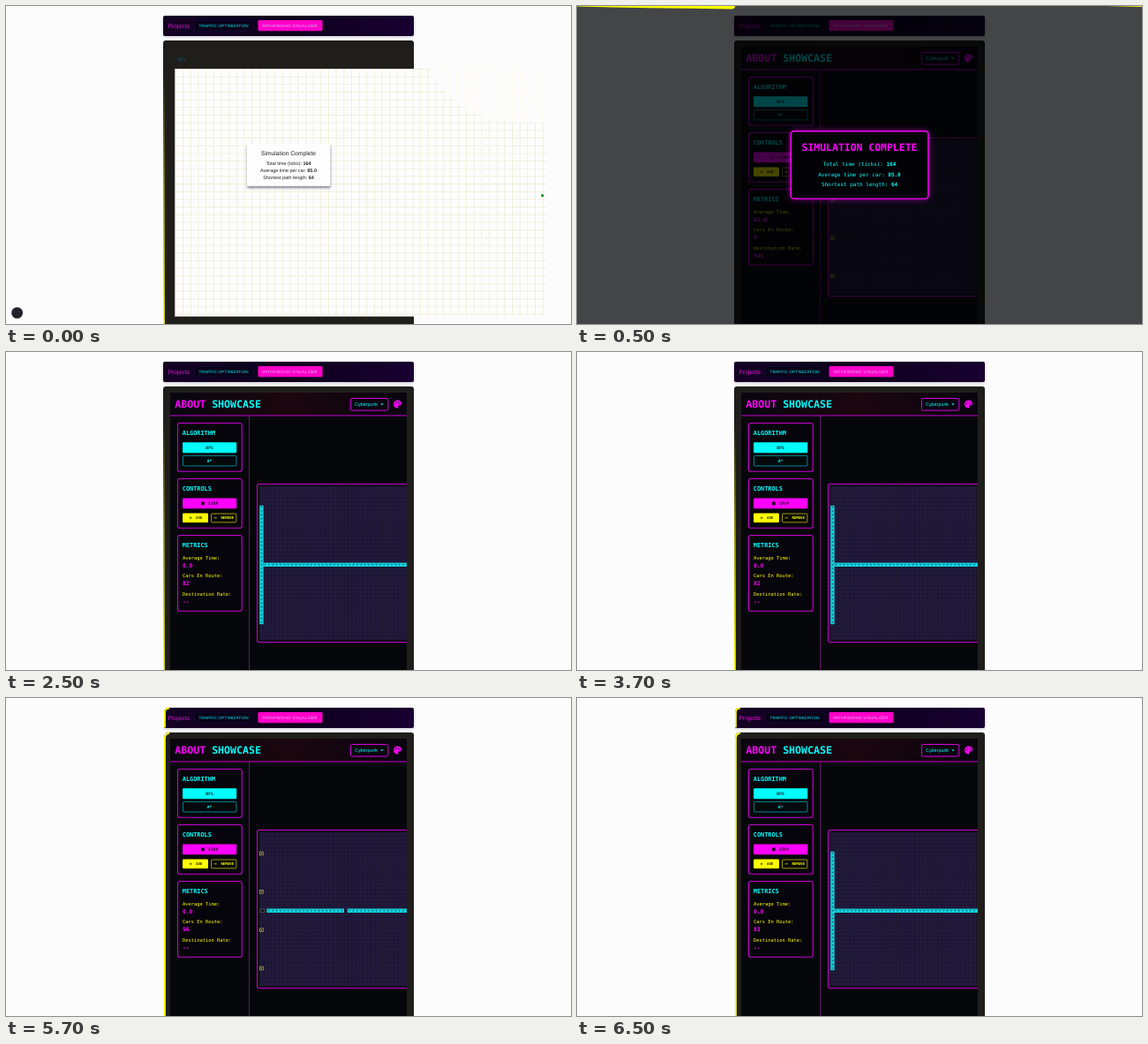
An HTML page for the animation above (8 s loop, 640x360 px).

```html
<!DOCTYPE html>
<html lang="en">
<head>
<meta charset="utf-8">
<title>Pathfinding showcase</title>
<style>
html, body { margin: 0; width: 100%; height: 100%; overflow: hidden; background: #fcfcfd; }
svg { display: block; width: 100vw; height: 100vh; }
text { font-family: "DejaVu Sans Mono", monospace; text-rendering: geometricPrecision; white-space: pre; }
.sans { font-family: "Liberation Sans", Arial, sans-serif; }
.b, .b text { font-weight: 700; }
.mid { text-anchor: middle; }
.mag { fill: #f0f; }
.cy { fill: #0ff; }
.yel { fill: #ff0; }
.head { font-size: 6.85px; font-weight: 700; fill: #0ff; }
.label { font-size: 5.43px; fill: #ff0; }
.value { font-size: 6.4px; font-weight: 700; fill: #f0f; }
.box { fill: #07050c; stroke: #c800d2; stroke-width: 1.1; }
.show { visibility: hidden; animation: 8s step-end infinite; }
.light { animation-name: light; }
.dash { animation-name: dash; }
.done { animation-name: done; }
.run { animation-name: run; }
.run1 { animation-name: run1; }
.run2 { animation-name: run2; }
.run3 { animation-name: run3; }
.full { animation-name: full; }
.spots { animation-name: spots; }
.edge { animation-name: edge; }
.fade { animation-name: fade; }
@keyframes light { 0% { visibility: visible } 6.25%, 100% { visibility: hidden } }
@keyframes dash { 0% { visibility: hidden } 6.25%, 100% { visibility: visible } }
@keyframes done { 0%, 31.25%, 100% { visibility: hidden } 6.25% { visibility: visible } }
@keyframes run { 0% { visibility: hidden } 31.25%, 100% { visibility: visible } }
@keyframes run1 { 0%, 56.25%, 100% { visibility: hidden } 31.25% { visibility: visible } }
@keyframes run2 { 0%, 81.25%, 100% { visibility: hidden } 56.25% { visibility: visible } }
@keyframes run3 { 0% { visibility: hidden } 81.25%, 100% { visibility: visible } }
@keyframes full { 0%, 56.25% { visibility: hidden } 31.25%, 81.25%, 100% { visibility: visible } }
@keyframes spots { 0%, 31.25%, 81.25%, 100% { visibility: hidden } 6.25%, 56.25% { visibility: visible } }
@keyframes edge { 0% { visibility: hidden } 56.25%, 100% { visibility: visible } }
@keyframes fade { 0%, 31.25% { visibility: visible } 6.25%, 56.25%, 100% { visibility: hidden } }
</style>
</head>
<body>
<svg viewBox="0 0 640 360">
  <defs>
    <linearGradient id="bar">
      <stop offset="0" stop-color="#150024"/>
      <stop offset=".5" stop-color="#0d001c"/>
      <stop offset="1" stop-color="#180030"/>
    </linearGradient>
    <linearGradient id="top">
      <stop offset="0" stop-color="#08060e"/>
      <stop offset=".5" stop-color="#1c060f"/>
      <stop offset="1" stop-color="#08040f"/>
    </linearGradient>
    <linearGradient id="strip" x2="0" y2="1">
      <stop offset="0" stop-color="#ff0" stop-opacity="0"/>
      <stop offset=".45" stop-color="#ff0" stop-opacity=".55"/>
      <stop offset="1" stop-color="#ff0"/>
    </linearGradient>
    <pattern id="dots" x="191.5" y="71" width="8.67" height="8.67" patternUnits="userSpaceOnUse">
      <path d="M.4 0V8.67M0 .4H8.67" fill="none" stroke="#d9d69c" stroke-width=".8" stroke-dasharray="1.45 1.44"/>
    </pattern>
    <pattern id="pale" x="191.5" y="71" width="8.67" height="8.67" patternUnits="userSpaceOnUse">
      <path d="M.4 0V8.67M0 .4H8.67" fill="none" stroke="#fbfad0" stroke-width=".8" stroke-dasharray="1.45 1.44"/>
    </pattern>
    <pattern id="cells" x="287.2" y="152" width="4.34" height="4.34" patternUnits="userSpaceOnUse">
      <rect width="4.34" height="4.34" fill="#221940"/>
      <path d="M0 .4H4.34M.4 0V4.34" stroke="#191526" stroke-width=".8"/>
    </pattern>
    <pattern id="cars" x="287.2" y="238.6" width="4.34" height="4.34" patternUnits="userSpaceOnUse">
      <rect width="4.34" height="4.34" fill="#087078"/>
      <rect x=".6" y=".6" width="3.2" height="3.2" fill="#0c9ca8" stroke="#10e4f0" stroke-width="1"/>
      <rect x="1.7" y="1.7" width="1" height="1" fill="#084850"/>
    </pattern>
    <filter id="soft" x="-20%" y="-30%" width="140%" height="160%">
      <feGaussianBlur stdDeviation="1.8"/>
    </filter>
    <filter id="glow" x="-20%" y="-30%" width="140%" height="160%">
      <feGaussianBlur stdDeviation="3.5"/>
    </filter>
    <clipPath id="app"><rect x="186" y="46" width="268" height="314"/></clipPath>
    <g id="spot">
      <rect x="-1.9" y="-1.9" width="3.8" height="3.8" fill="#18140c" stroke="#b9ad78" stroke-width=".7"/>
      <rect x="-.6" y="-.6" width="1.2" height="1.2" fill="#e8dca0"/>
    </g>
  </defs>

  <rect width="640" height="360" fill="#fcfcfd"/>

  <!-- navigation bar and panel -->
  <rect x="178" y="12" width="284" height="23" rx="2" fill="#889" opacity=".5" filter="url(#soft)"/>
  <rect x="178" y="11" width="284" height="23" rx="2" fill="url(#bar)"/>
  <text class="sans" x="183.4" y="24.6" font-size="6.8" fill="#e010d8">Projects</text>
  <rect x="213.5" y="16.3" width="66.5" height="11.6" rx="1.4" fill="#0a0018" stroke="#101038" stroke-width=".7"/>
  <text class="sans cy" x="218.5" y="23.8" font-size="4.66" letter-spacing=".13">TRAFFIC OPTIMIZATION</text>
  <rect x="285.5" y="16" width="73" height="12.2" rx="1.4" fill="#ff00c8"/>
  <text class="sans" x="290.4" y="23.8" font-size="4.68" letter-spacing=".13" fill="#ecb0ff">PATHFINDING VISUALIZER</text>
  <rect x="178" y="39" width="284" height="330" rx="3" fill="#201e1b"/>
  <rect class="show fade" x="178" y="80" width="1.8" height="280" fill="url(#strip)"/>
  <g class="show edge">
    <path d="M176 10H186Q179 11 179 16V35H176ZM176 38H186Q179 39 179 46V360H176Z" fill="#fcfcfd"/>
    <path d="M185 11.5Q179.9 11.8 179.9 16V33.5M185 39.7Q179.9 40.3 179.9 46V360" fill="none" stroke="#ff0" stroke-width="1.9"/>
  </g>

  <!-- light view -->
  <g class="show light">
    <text class="sans" x="195" y="61.8" font-size="4.7" fill="#0c5878">BFS</text>
    <rect x="191.3" y="71" width="420.7" height="280.5" fill="#fdfdfe"/>
    <path d="M191.3 71H480Q500 112 545 126Q575 133 612 132V351.5H191.3Z" fill="url(#dots)"/>
    <path d="M480 71H612V132Q575 133 545 126Q500 112 480 71Z" fill="url(#pale)"/>
    <circle cx="607.6" cy="214.6" r="1.6" fill="#0a8a1c"/>
    <rect x="273" y="158" width="94.5" height="48" rx="1.5" fill="#445" opacity=".65" filter="url(#soft)"/>
    <rect x="272.8" y="156" width="94.6" height="48" rx="1.5" fill="#fdfdfe"/>
    <g class="mid" fill="#222">
      <text class="sans" x="320" y="169.3" font-size="6.72">Simulation Complete</text>
      <g font-size="5.43">
        <text class="sans" x="320" y="180.2">Total time (ticks): <tspan class="b">164</tspan></text>
        <text class="sans" x="320" y="188.2">Average time per car: <tspan class="b">85.0</tspan></text>
        <text class="sans" x="320" y="196.3">Shortest path length: <tspan class="b">64</tspan></text>
      </g>
    </g>
    <circle cx="12.6" cy="347.4" r="6.4" fill="#22222c"/>
  </g>

  <!-- dark dashboard -->
  <g class="show dash" clip-path="url(#app)">
    <rect x="186" y="46" width="268" height="314" fill="#05070a"/>
    <rect x="186" y="46" width="268" height="26" fill="url(#top)"/>
    <path d="M186 72H454" stroke="#c800d2"/>
    <path d="M275.6 72V360" stroke="#7c1684" stroke-width=".9"/>
    <text class="b" x="191.3" y="63.1" font-size="11.58"><tspan class="mag">ABOUT</tspan> <tspan class="cy">SHOWCASE</tspan></text>

    <rect x="390.4" y="52.5" width="42.4" height="13.6" rx="2" fill="#0a0510" stroke="#d800e0"/>
    <text class="sans cy" x="395" y="61.1" font-size="5.4">Cyberpunk</text>
    <path class="cy" d="M424.2 58.4h3.4l-1.7 1.9z"/>
    <path class="mag" d="M443.4 54.6a4.5 4.5 0 1 0 0 9c1.2 0 1.3-1 .8-1.6c-.5-.8 0-1.6.9-1.6h1.2c1.1 0 1.7-.8 1.7-1.9c0-2.2-2-3.9-4.6-3.9z"/>
    <g fill="#10040f">
      <circle cx="440.8" cy="59" r=".7"/><circle cx="442.1" cy="57" r=".7"/>
      <circle cx="444.6" cy="57" r=".7"/><circle cx="446.1" cy="58.7" r=".7"/>
    </g>

    <g class="box">
      <rect x="194.5" y="80.5" width="72.7" height="54.7" rx="2"/>
      <rect x="194.5" y="143.5" width="72.7" height="55.7" rx="2"/>
      <rect x="194.5" y="207.5" width="72.7" height="85.7" rx="2"/>
    </g>
    <text class="head" x="199.8" y="94.2">ALGORITHM</text>
    <text class="head" x="199.8" y="157.4">CONTROLS</text>
    <text class="head" x="199.8" y="221.2">METRICS</text>

    <rect class="cy" x="200" y="102.3" width="61.2" height="12" rx="1"/>
    <text class="b mid" x="230.6" y="110" font-size="4.7" fill="#042428">BFS</text>
    <rect x="200.4" y="117.4" width="60.5" height="11.6" rx="1" fill="#04090c" stroke="#0aa4b4" stroke-width=".8"/>
    <text class="b mid cy" x="230.6" y="124.9" font-size="4.7">A*</text>

    <rect class="mag" x="200" y="165.5" width="61.2" height="11.8" rx="1"/>
    <g class="b" fill="#1c001e" font-size="4.65">
      <g class="show run"><rect x="221" y="169.6" width="3.7" height="3.7"/><text x="229" y="173.1">STOP</text></g>
      <g class="show done"><path d="M220 169.4l3.2 2l-3.2 2z"/><text x="227.6" y="173.1">START</text></g>
    </g>
    <rect class="yel" x="200" y="182.6" width="29" height="10.5" rx="1"/>
    <path d="M207.6 187.8h3M209.1 186.3v3" stroke="#332" stroke-width=".7"/>
    <text class="b" x="215" y="189.2" font-size="4" fill="#332f00">ADD</text>
    <rect x="232.5" y="183" width="28.4" height="9.8" rx="1" fill="#080808" stroke="#c4bc10" stroke-width=".8"/>
    <path d="M235.6 187.8h3.2" stroke="#ff0" stroke-width=".7"/>
    <text class="b yel" x="243.4" y="189.2" font-size="4">REMOVE</text>

    <g class="label">
      <text x="199.9" y="235.1">Average Time:</text>
      <text x="199.9" y="255.1">Cars En Route:</text>
      <text x="199.9" y="275.6">Destination Rate:</text>
    </g>
    <g class="value">
      <g class="show run"><text x="199.9" y="243.9">0.0</text><text x="199.9" y="284.6">--</text></g>
      <text class="show run1" x="199.9" y="264.2">82</text>
      <text class="show run2" x="199.9" y="264.2">56</text>
      <text class="show run3" x="199.9" y="264.2">83</text>
      <g class="show done">
        <text x="199.9" y="243.9">85.0</text><text x="199.9" y="264.2">0</text><text x="199.9" y="284.6">94%</text>
      </g>
    </g>

    <!-- road map -->
    <rect x="284.5" y="149.5" width="200" height="179" rx="1.5" fill="#100c18" stroke="#c800d2"/>
    <rect x="287.2" y="152" width="170" height="174" fill="url(#cells)"/>
    <g class="show spots">
      <use href="#spot" x="289.4" y="176"/><use href="#spot" x="289.4" y="219.3"/>
      <use href="#spot" x="289.4" y="262.7"/><use href="#spot" x="289.4" y="306"/>
    </g>
    <g class="show full" fill="url(#cars)">
      <rect x="287.2" y="173.8" width="4.4" height="134.4"/>
      <rect x="291.5" y="238.6" width="163" height="4.4"/>
    </g>
    <g class="show run2">
      <rect x="288" y="239" width="5" height="3.6" fill="#14161c" stroke="#5c5c60" stroke-width=".7"/>
      <path d="M295.5 238.6H383V243H295.5ZM386.8 238.6H454V243H386.8Z" fill="url(#cars)"/>
    </g>
  </g>

  <!-- finished dialog -->
  <g class="show done">
    <rect width="640" height="360" fill="#000204" fill-opacity=".73"/>
    <path class="yel" d="M0 0H179Q179 3.4 175 3.4Q80 2.6 0 .6Z"/>
    <path class="yel" d="M600 0H640V1Z"/>
    <rect x="242" y="141.5" width="156" height="77" rx="4" fill="#f0f" opacity=".6" filter="url(#glow)"/>
    <rect x="242.3" y="141.7" width="155.6" height="76.4" rx="3.5" fill="#030206" stroke="#f0f" stroke-width="1.4"/>
    <g class="mid">
      <text class="mag b" x="320" y="163.7" font-size="11.45">SIMULATION COMPLETE</text>
      <g class="cy" font-size="5.97">
        <text x="320" y="181.4">Total time (ticks): <tspan class="b">164</tspan></text>
        <text x="320" y="192.8">Average time per car: <tspan class="b">85.0</tspan></text>
        <text x="320" y="204.2">Shortest path length: <tspan class="b">64</tspan></text>
      </g>
    </g>
  </g>
</svg>
</body>
</html>
```
